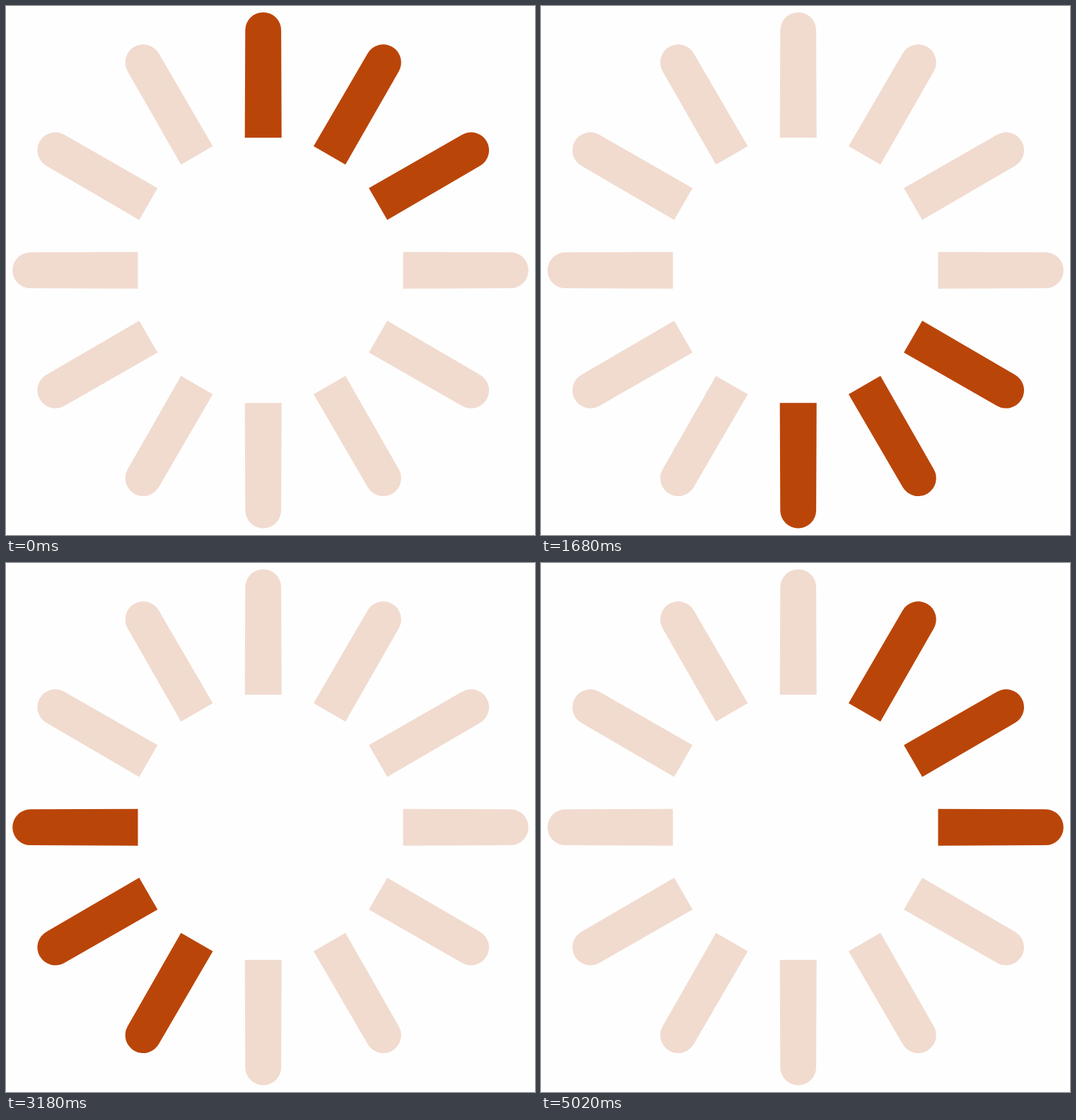
Write an HTML page with a canvas that moves like this. It is 748 px wide and 748 px high and loops after 5100 ms.

```html
<!DOCTYPE html>
<html lang="en">
<head>
<meta charset="utf-8">
<title>Spinner</title>
<style>
  html, body { margin: 0; width: 100%; height: 100%; overflow: hidden; background: #fefefe; }
  canvas { display: block; }
</style>
</head>
<body>
<canvas id="stage" width="748" height="748"></canvas>
<script>
const SIZE = 748, LOOP = 5100, SPOKES = 12, LIT = 3;
const ON = '#ba4509', OFF = '#f1dbcf';
const CENTER_X = 363.7, CENTER_Y = 373.7;
const INNER = 187.5, OUTER = 339.4, CAP = 25.4, HALF_BASE = 26;
const ctx = document.getElementById('stage').getContext('2d');

// One upright spoke, slightly wider at its flat inner end
const spoke = new Path2D();
spoke.moveTo(-HALF_BASE, -INNER);
spoke.arc(0, -OUTER, CAP, Math.PI, 0);
spoke.lineTo(HALF_BASE, -INNER);
spoke.closePath();

// Steps last 80 or 130 ms, the long ones spread evenly
const stepStart = k => 80 * k + 50 * Math.ceil(0.4385 * k);

function drawSpoke(i, color) {
  const horizontal = i % 6 === 3;
  ctx.save();
  // The horizontal pair is centred on the stage, the others sit left of it
  ctx.translate(horizontal ? SIZE / 2 : CENTER_X, CENTER_Y);
  ctx.rotate(i * 2 * Math.PI / SPOKES);
  ctx.fillStyle = color;
  ctx.fill(spoke);
  ctx.restore();
}

function draw() {
  const time = performance.now() % LOOP;
  let step = 0;
  while (stepStart(step + 1) <= time) step++;
  ctx.clearRect(0, 0, SIZE, SIZE);
  for (let i = 0; i < SPOKES; i++) {
    const behind = (i - step % SPOKES + SPOKES) % SPOKES;
    drawSpoke(i, behind < LIT ? ON : OFF);
  }
  requestAnimationFrame(draw);
}
draw();
</script>
</body>
</html>
```
